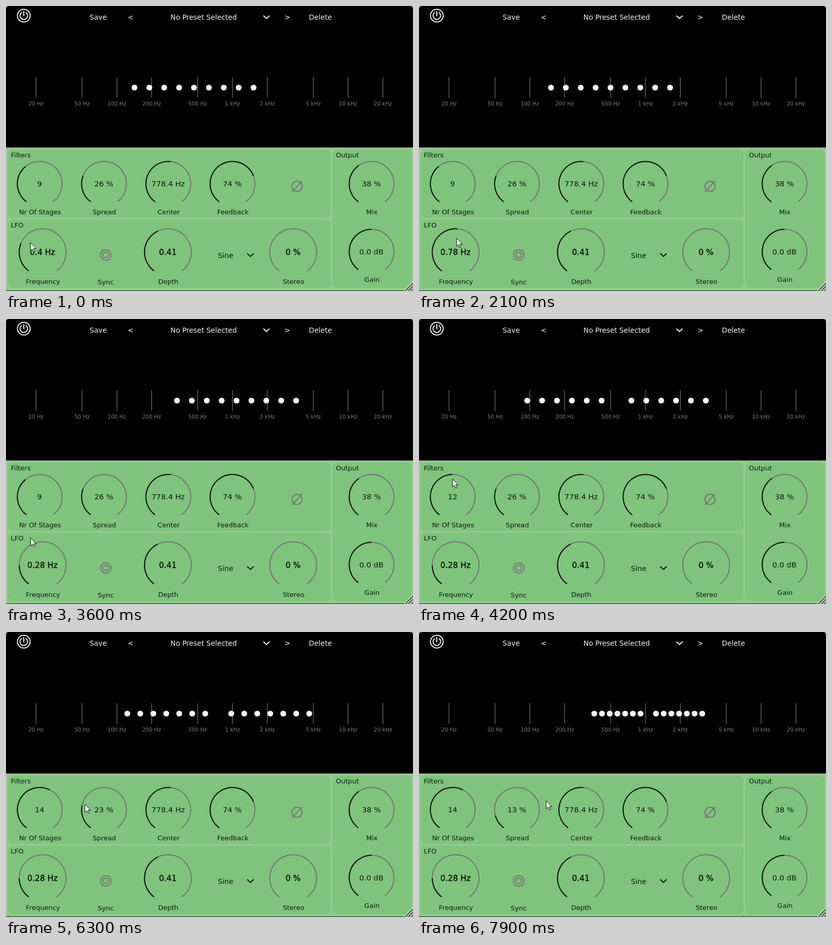
An HTML page for the animation above (8000 ms loop, 800 by 561 pixels).

```html
<!DOCTYPE html>
<html lang="en">
<head>
<meta charset="utf-8">
<title>Phaser panel</title>
<style>
  html, body { margin: 0; width: 100%; height: 100%; overflow: hidden; background: #000; }
  svg { display: block; width: 800px; height: 561px; font-family: "DejaVu Sans", Verdana, sans-serif; }
  .bar { font-size: 13.8px; fill: #f4f4f4; }
  .axis { font-size: 10.5px; fill: #7c7c7c; }
  .label { font-size: 13px; fill: #101a10; }
  .value { font-size: 14.7px; fill: #101a10; }
  .strong { font-size: 15.5px; fill: #061006; stroke: #061006; stroke-width: .35px; }
  .mid { text-anchor: middle; }
  .line { fill: none; stroke-width: 2; }
  .gray { stroke: #747474; }
  .dark { stroke: #0c120c; }
  .white { stroke: #f4f4f4; }
</style>
</head>
<body>
<svg id="stage" viewBox="0 0 800 561">
  <rect width="800" height="561" fill="#101510"/>
  <path d="M0 0H800V560H0Z" fill="#8fcb8c"/>
  <path d="M0 278.5V6Q0 0 6 0H794Q800 0 800 6V278.5Z"/>
  <g fill="#7fc37d">
    <rect x="4" y="283" width="634" height="134" rx="9"/>
    <rect x="4" y="421" width="634" height="134" rx="9"/>
    <rect x="642" y="283" width="155" height="272" rx="9"/>
  </g>

  <g class="line white">
    <circle cx="35" cy="19" r="12.5"/>
    <path d="M31 12.6A7.5 7.5 0 1 0 39 12.6M35 10V20"/>
    <path d="M506 19L512 24.7L518 19"/>
  </g>
  <g class="bar mid">
    <text x="181.3" y="26.7">Save</text>
    <text x="245" y="26.7">&lt;</text>
    <text x="388.5" y="26.7">No Preset Selected</text>
    <text x="553" y="26.7">&gt;</text>
    <text x="618" y="26.7">Delete</text>
  </g>

  <g id="axis"></g>
  <g id="dots" fill="#fff"></g>

  <g class="label">
    <text x="9.5" y="298">Filters</text>
    <text x="9.5" y="435.5">LFO</text>
    <text x="648.5" y="298">Output</text>
    <text class="mid" x="196" y="547.5">Sync</text>
    <text x="416.5" y="496" font-size="14" style="font-size:14px">Sine</text>
  </g>
  <path class="line dark" d="M474 487L480.5 493L487 487"/>
  <g class="line gray">
    <circle cx="572" cy="355" r="10"/>
    <path d="M562 366L582 344.5"/>
    <circle cx="196" cy="490" r="10.2"/>
    <circle cx="196" cy="490" r="5.4"/>
  </g>
  <g id="knobs"></g>

  <path d="M783 561L800 544V561Z" fill="#8a9a88"/>
  <path d="M783 560L800 543M789 560L800 549M795 560L800 555" stroke="#e8efe6" stroke-width="1.3"/>
  <path d="M785 560L800 545M791 560L800 551M797 560L800 557" stroke="#303830" stroke-width="1.3"/>

  <path id="cursor" d="M0 0V16L3.7 12.6L6.2 18L8.6 17L6.2 11.6H11.2Z" fill="#fff" stroke="#000" stroke-width="1"/>
</svg>
<script>
const LOOP = 8000, STEP = 100, SWEEP = 143.6;
const DECADE = 227.3, DEPTH = 0.41, CENTER = 778.4;
const $ = id => document.getElementById(id);

function add(parent, tag, attrs, text) {
  const el = document.createElementNS("http://www.w3.org/2000/svg", tag);
  for (const k in attrs) el.setAttribute(k, attrs[k]);
  if (text) el.textContent = text;
  return parent.appendChild(el);
}

const freqX = hz => 59 + DECADE * Math.log10(hz / 20);

for (const hz of [20, 50, 100, 200, 500, 1000, 2000, 5000, 10000, 20000]) {
  const x = freqX(hz);
  add($("axis"), "path", { d: `M${x} 140V181`, stroke: "#646464", "stroke-width": 1.4 });
  add($("axis"), "text", { class: "axis mid", x, y: 196.3 }, hz < 1000 ? hz + " Hz" : hz / 1000 + " kHz");
}

function arc(cx, cy, r, from, to) {
  const at = deg => {
    const a = deg * Math.PI / 180;
    return (cx + r * Math.sin(a)).toFixed(2) + " " + (cy - r * Math.cos(a)).toFixed(2);
  };
  return `M${at(from)}A${r} ${r} 0 ${to - from > 180 ? 1 : 0} 1 ${at(to)}`;
}

// pos runs from 0 to 1 over the knob's full sweep
function knob(cx, cy, r, name, labelY, value, pos, strong) {
  const g = $("knobs");
  add(g, "path", { class: "line gray", d: arc(cx, cy, r, -SWEEP, SWEEP) });
  const active = add(g, "path", { class: "line dark" });
  const text = add(g, "text", { class: "mid " + (strong ? "strong" : "value"), x: cx - 0.3, y: cy + 5.2 });
  add(g, "text", { class: "label mid", x: cx + 0.7, y: labelY }, name);
  const set = (v, p) => {
    text.textContent = v;
    active.setAttribute("d", p > 0 ? arc(cx, cy, r, -SWEEP, SWEEP * (2 * p - 1)) : "");
  };
  set(value, pos);
  return set;
}

const setStages = knob(66.3, 350, 44, "Nr Of Stages", 409.5, "9", 0.36);
const setSpread = knob(192.6, 350, 44, "Spread", 409.5, "26 %", 0.26);
knob(319, 350, 44, "Center", 409.5, "778.4 Hz", 0.52);
knob(445.2, 350, 44, "Feedback", 409.5, "74 %", 0.74);
const setFreq = knob(72, 484.5, 46, "Frequency", 547, "0.4 Hz", 0.27, true);
knob(318.3, 484.5, 46, "Depth", 547, "0.41", 0.41, true);
knob(564.5, 484.5, 46, "Stereo", 547, "0 %", 0, true);
knob(718.6, 350, 44, "Mix", 409.5, "38 %", 0.38);
knob(718.6, 483.5, 44, "Gain", 542.5, "0.0 dB", 0.5);

const dots = Array.from({ length: 14 }, () => add($("dots"), "circle", { cy: 160.6, r: 5.7 }));

// keys: [seconds, value...]
const freqKeys = [[0, .4], [.5, .52], [1.2, .74], [2.1, .78], [2.4, 1.08], [2.9, .44], [3.2, .48], [3.5, .28]];
const stageKeys = [[3.8, 9], [4.2, 12], [4.6, 14]];
const spreadKeys = [[5.9, 26], [7.1, 16.1], [7.4, 13.47]];
const mouseKeys = [
  [0, 48, 466], [.5, 53, 460], [1.2, 70, 457], [2.1, 74, 457], [2.4, 88, 463],
  [2.9, 57, 469], [3.2, 60, 467], [3.5, 50, 482], [3.8, 45, 328], [4.2, 66, 315],
  [4.6, 80, 317], [4.9, 83, 319], [5.4, 187, 333], [5.9, 158, 335], [7.1, 149, 347],
  [7.4, 151, 358], [7.9, 250, 332]
];
// LFO phase: [seconds, radians, radians per second]
const phaseKeys = [
  [0, -20.236, 3.77], [2.1, -7.353, 7.35], [2.9, -1.051, 4.15], [4.2, 3.888, 2.64],
  [5.4, 7.063, 2.64], [7.1, 11.67, 2.64], [7.9, 13.627, 2.64]
];

function segment(keys, t) {
  let i = 0;
  while (i < keys.length - 2 && t >= keys[i + 1][0]) i++;
  const a = keys[i], b = keys[i + 1];
  return { a, b, u: Math.min(1, Math.max(0, (t - a[0]) / (b[0] - a[0]))) };
}

function lerp(keys, t, col = 1) {
  const { a, b, u } = segment(keys, t);
  return a[col] + (b[col] - a[col]) * u;
}

function hermite(keys, t) {
  const { a, b, u } = segment(keys, t);
  const h = b[0] - a[0], v = 1 - u;
  return v * v * ((1 + 2 * u) * a[1] + u * h * a[2]) + u * u * ((3 - 2 * u) * b[1] - v * h * b[2]);
}

function draw(t) {
  const freq = lerp(freqKeys, t);
  const stages = Math.round(lerp(stageKeys, t));
  const spread = lerp(spreadKeys, t);
  setFreq(+freq.toFixed(2) + " Hz", freq * 0.661);
  setStages(stages, (stages - 1) / 22);
  setSpread(Math.round(spread) + " %", spread / 100);

  const mid = freqX(CENTER * (1 + DEPTH * Math.sin(hermite(phaseKeys, t))));
  const half = Math.floor(stages / 2);
  dots.forEach((dot, i) => {
    let k = i - half;
    if (stages % 2 === 0 && k >= 0) k++;   // even counts leave the middle empty
    dot.setAttribute("cx", (mid + k * spread * 1.1255).toFixed(2));
    dot.setAttribute("visibility", i < stages ? "visible" : "hidden");
  });
  $("cursor").setAttribute("transform", `translate(${lerp(mouseKeys, t, 1)} ${lerp(mouseKeys, t, 2)})`);
}

const start = performance.now();
function tick(now) {
  const ms = Math.max(0, now - start) % LOOP;
  draw(Math.floor(ms / STEP) * STEP / 1000);
  requestAnimationFrame(tick);
}
draw(0);
requestAnimationFrame(tick);
</script>
</body>
</html>
```
